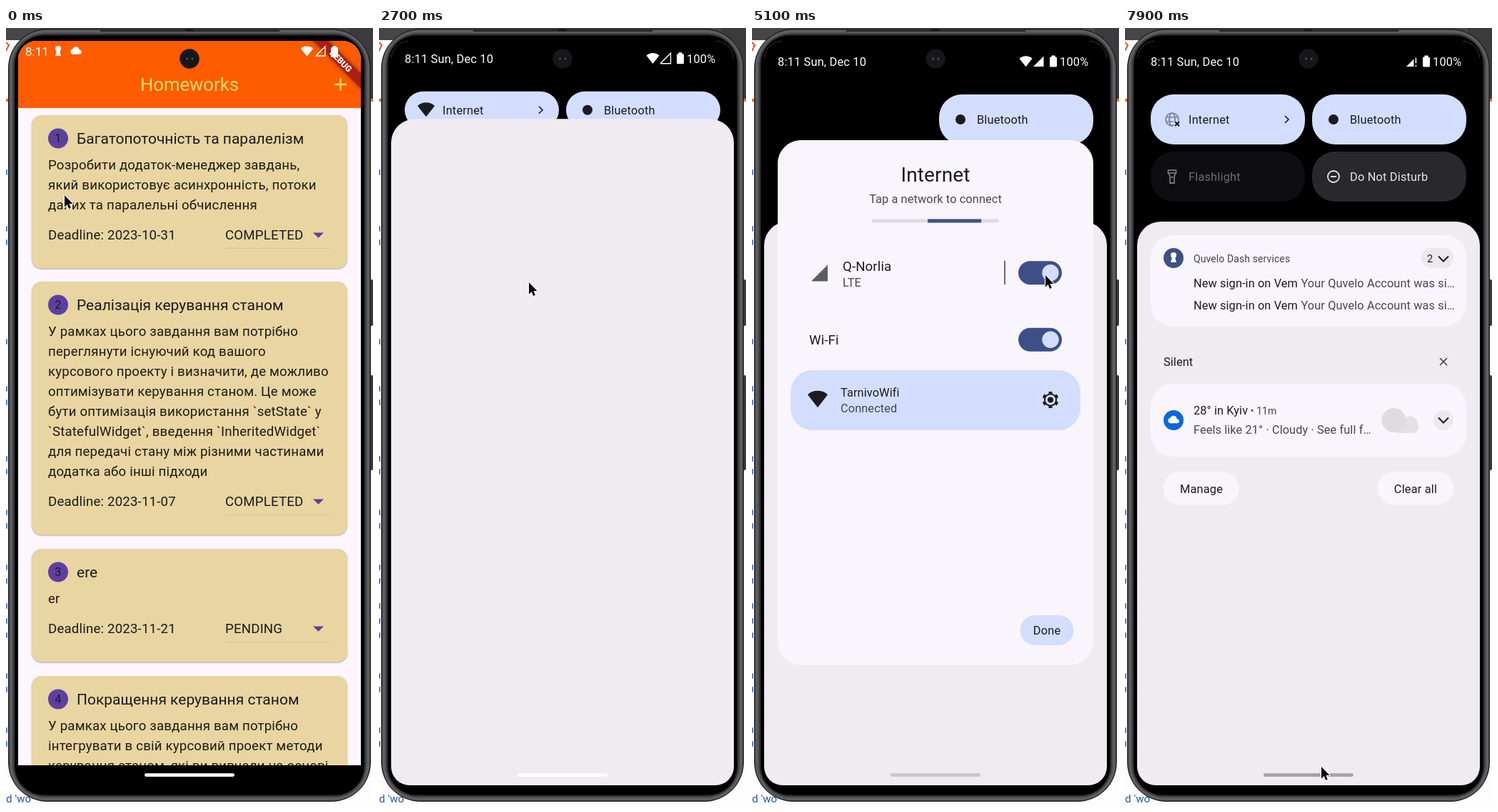
An HTML page with a canvas for the animation above (8000 ms loop, 514 px wide and 1089 px high).

```html
<!DOCTYPE html>
<html lang="uk">
<head>
<meta charset="utf-8">
<style>
  html, body { margin: 0; width: 514px; height: 1089px; overflow: hidden; }
  canvas { display: block; }
</style>
</head>
<body>
<canvas id="stage" width="514" height="1089"></canvas>
<script>
const g = document.getElementById('stage').getContext('2d');
const INK = '#1b1b1f', GREY = '#46464d', BLUE = '#d3deff', NAVY = '#3e4f88', CARD = '#f9f5fc';
const PURPLE = '#5e3fa0', YELLOW = '#fadc6b', LOOP = 8000, BODY = 16.33;

const clamp = x => Math.max(0, Math.min(1, x));
const lerp = (a, b, k) => a + (b - a) * k;
const smooth = x => (x = clamp(x), x * x * (3 - 2 * x));
const easeOut = x => 1 - (1 - clamp(x)) ** 3;

// Piecewise eased value for keys [time, ...values]
function track(keys, t) {
  const i = keys.findIndex(k => k[0] > t);
  if (i < 0) return keys.at(-1).slice(1);
  const a = keys[i - 1], b = keys[i], k = smooth((t - a[0]) / (b[0] - a[0]));
  return a.slice(1).map((v, j) => lerp(v, b[j + 1], k));
}

function box(x, y, w, h, r, fill) {
  g.beginPath();
  g.roundRect(x, y, w, h, r);
  g.fillStyle = fill;
  g.fill();
}
function disc(x, y, r, fill) {
  g.beginPath();
  g.arc(x, y, r, 0, 7);
  g.fillStyle = fill;
  g.fill();
}
function ring(x, y, r, color, width) {
  g.beginPath();
  g.arc(x, y, r, 0, 7);
  g.strokeStyle = color;
  g.lineWidth = width;
  g.stroke();
}
function poly(points, fill) {
  g.beginPath();
  points.forEach(p => g.lineTo(...p));
  g.closePath();
  g.fillStyle = fill;
  g.fill();
}
function line(points, color, width) {
  g.beginPath();
  points.forEach(p => g.lineTo(...p));
  g.strokeStyle = color;
  g.lineWidth = width;
  g.stroke();
}
// y is the middle of the capitals; returns the end of the text
function text(s, x, y, size, fill, { ls = 0.1, weight = 400, align = 'left' } = {}) {
  g.font = `${weight} ${size}px Roboto, sans-serif`;
  g.letterSpacing = ls + 'px';
  g.textAlign = align;
  g.fillStyle = fill;
  g.fillText(s, x, y + size * 0.355);
  return x + g.measureText(s).width;
}
function faded(alpha, draw) {
  if (alpha <= 0) return;
  g.save();
  g.globalAlpha *= Math.min(1, alpha);
  draw();
  g.restore();
}

// Icons
function wifi(x, y, w, fill) {
  const h = w * 0.4;
  g.beginPath();
  g.moveTo(x, y + h);
  g.lineTo(x - w / 2, y - h * 0.6);
  g.bezierCurveTo(x - w / 4, y - h * 1.25, x + w / 4, y - h * 1.25, x + w / 2, y - h * 0.6);
  g.fillStyle = fill;
  g.fill();
}
function signal(x, y, s, color, mode) {
  const tri = [[x, y + s], [x + s, y + s], [x + s, y]];
  if (mode === 'empty') {
    line([...tri, tri[0]], color, 1.4);
    return;
  }
  if (mode === 'full') return poly(tri, color);
  const cut = x + s * 0.72;
  poly([[x, y + s], [cut, y + s], [cut, y + s * 0.28]], color);
  box(x + s * 0.87, y + s * 0.15, s * 0.11, s * 0.52, 0, color);
  box(x + s * 0.87, y + s * 0.85, s * 0.11, s * 0.15, 0, color);
}
function battery(x, y) {
  box(x + 2.5, y, 5, 3, 0, '#fff');
  box(x, y + 2, 10, 14, 1.5, '#fff');
}
function keyhole(x, y, s, fill) {
  disc(x, y - 3 * s, 4 * s, fill);
  poly([[x - 2 * s, y], [x + 2 * s, y], [x + 4 * s, y + 7 * s], [x - 4 * s, y + 7 * s]], fill);
}
function cloud(x, y, s, fill) {
  disc(x - 4 * s, y + s, 4 * s, fill);
  disc(x, y - s, 5 * s, fill);
  disc(x + 5 * s, y + 1.8 * s, 3.2 * s, fill);
  box(x - 4 * s, y + s, 9 * s, 4 * s, 0, fill);
}
const chevronDown = (x, y) => line([[x - 7, y - 3.5], [x, y + 3.5], [x + 7, y - 3.5]], INK, 2);
const cross = (x, y, r, c, w) => {
  line([[x - r, y - r], [x + r, y + r]], c, w);
  line([[x - r, y + r], [x + r, y - r]], c, w);
};
function globe(x, y) {
  const c = '#77809a';
  ring(x, y, 9, c, 1.7);
  g.beginPath();
  g.ellipse(x, y, 4, 9, 0, 0, 7);
  g.stroke();
  line([[x - 8, y - 3], [x + 8, y - 3]], c, 1.5);
  line([[x - 8, y + 3], [x + 8, y + 3]], c, 1.5);
  box(x + 2, y + 2, 9, 9, 0, BLUE);
  cross(x + 7, y + 6, 3, INK, 2.2);
}
function torch(x, y, c) {
  g.strokeStyle = c;
  g.lineWidth = 1.8;
  g.strokeRect(x - 5.5, y - 9, 11, 4);
  line([[x - 5.5, y - 5], [x - 3, y - 1], [x - 3, y + 9], [x + 3, y + 9], [x + 3, y - 1], [x + 5.5, y - 5]], c, 1.8);
  disc(x, y + 1, 1.4, c);
}
function gear(x, y) {
  ring(x, y, 8, INK, 2.2);
  for (let i = 0; i < 6; i++) {
    const a = i * Math.PI / 3 + Math.PI / 6, c = Math.cos(a), s = Math.sin(a);
    line([[x + c * 8, y + s * 8], [x + c * 11.5, y + s * 11.5]], INK, 5);
  }
  disc(x, y, 7, BLUE);
  disc(x, y, 4, INK);
}

// Phone and the desktop slivers around it
function desktop() {
  box(0, 0, 514, 1089, 0, '#fdfdfd');
  box(0, 0, 514, 17, 0, '#464648');
  box(480, 0, 34, 100, 0, '#3b3b3d');
  box(0, 99, 514, 4, 0, '#e8722e');
  line([[0, 20], [4, 24], [0, 32]], '#e2572b', 2);
  for (const y of [202, 281, 300, 439, 505, 524, 603, 621, 678, 697, 755, 774, 809, 830, 850, 907, 926, 983, 1002])
    box(0, y - 4, 2, 8, 1, '#5c86cc');
  text("d 'wo", 0, 1079, 15, '#2455a8');
  for (const [y, h] of [[352, 65], [486, 133]]) box(507, y, 7, h, 2, '#39393b');
  const shells = [[3, '#1c1c1d'], [4.5, '#5f5f62'], [8.5, '#4a4a4d'], [10.5, '#2b2b2d'], [12.5, '#000']];
  for (const [d, c] of shells) box(d, d - 2, 514 - 2 * d, 1088 - 2 * d, 60 - d * 1.6, c);
  line([[132, 4], [383, 4]], '#222', 2);
  box(251, 1, 11, 4, 0, '#1a1a1a');
}

const tasks = [
  [122, 'Багатопоточність та паралелізм', '2023-10-31', 'COMPLETED',
    ['Розробити додаток-менеджер завдань,', 'який використовує асинхронність, потоки', 'даних та паралельні обчислення']],
  [355, 'Реалізація керування станом', '2023-11-07', 'COMPLETED',
    ['У рамках цього завдання вам потрібно', 'переглянути існуючий код вашого', 'курсового проекту і визначити, де можливо',
      'оптимізувати керування станом. Це може', 'бути оптимізація використання `setState` у',
      '`StatefulWidget`, введення `InheritedWidget`', 'для передачі стану між різними частинами', 'додатка або інші підходи']],
  [729, 'ere', '2023-11-21', 'PENDING', ['er']],
  [907, 'Покращення керування станом', '', '',
    ['У рамках цього завдання вам потрібно', 'інтегрувати в свій курсовий проект методи', 'керування станом, які ви вивчали на основі']]
];

function taskCard([top, title, date, status, rows], i) {
  const due = top + 70 + rows.length * 28 + 13.5, ls = 0.175;
  g.save();
  g.shadowColor = '#0005';
  g.shadowBlur = 2;
  g.shadowOffsetY = 1;
  box(36, top, 442, due + 47 - top, 14, '#e8d5a1');
  g.restore();
  disc(73, top + 32.5, 14, PURPLE);
  text(i + 1, 73, top + 32.5, 16.3, INK, { align: 'center' });
  text(title, 99, top + 33, 21, INK, { ls: 0 });
  rows.forEach((s, j) => text(s, 59, top + 69.5 + j * 28, 18.67, '#1f1b16', { ls }));
  if (!date) return;
  text('Deadline: ' + date, 59, due, 18.67, INK, { ls });
  text(status, 307, due, 18.67, INK, { ls });
  poly([[430, due - 3], [445, due - 3], [437.5, due + 4.3]], PURPLE);
  box(307, due + 18.5, 148, 1, 0, '#d6c7a3');
}

function app() {
  box(17, 18, 480, 1014, 0, '#fdf6ff');
  g.save();
  g.beginPath();
  g.rect(17, 112, 480, 920);
  g.clip();
  tasks.forEach(taskCard);
  g.restore();
  box(17, 18, 480, 94, 0, '#ff5c00');
  text('Homeworks', 257, 79, 25.67, YELLOW, { align: 'center', ls: 0 });
  line([[460, 79], [477, 79]], YELLOW, 2.3);
  line([[468.5, 70.5], [468.5, 87.5]], YELLOW, 2.3);
  g.save();
  g.translate(497, 18);
  g.rotate(Math.PI / 4);
  g.shadowColor = '#0008';
  g.shadowBlur = 6;
  box(-80, 32.7, 160, 14, 0, '#ad1d12');
  g.shadowColor = 'transparent';
  text('DEBUG', 0, 39.7, 11.9, '#fff', { weight: 900, align: 'center', ls: 0 });
  g.restore();
  text('8:11', 27, 33, 17, '#fff', { ls: 0 });
  keyhole(73, 32, 1, '#fff');
  cloud(98, 32, 0.95, '#fff');
  wifi(421.5, 33, 17, '#fff');
  signal(434, 26, 13, '#fff', 'empty');
  battery(455, 25);
}

function tile(x, y, h, label, fill, color, icon) {
  box(x, y, 216, h, Math.min(32, h / 2), fill);
  icon(x + 30, y + h / 2);
  text(label, x + 53, y + h / 2, BODY, color, { ls: 0.2 });
}

function notifications() {
  box(36, 290, 442, 127.5, 31, CARD);
  disc(68, 322, 14, NAVY);
  keyhole(68, 321, 1, '#fff');
  text('Quvelo Dash services', 96, 323, 14, GREY);
  box(415, 308, 45, 28, 14, '#ece8ee');
  text('2', 423, 323, 14.5, INK);
  chevronDown(446, 323);
  for (const y of [357, 388.5]) {
    const x = text('New sign-in on Vem', 96, y, BODY, INK);
    text('Your Quvelo Account was si…', x + 4.5, y, BODY, GREY);
  }
  text('Silent', 54, 467, BODY, INK);
  cross(446, 467, 5, GREY, 1.7);
  box(36, 498, 442, 102, 31, CARD);
  disc(68, 549, 14, '#0b66dd');
  cloud(68, 548.5, 0.95, '#fff');
  const x = text('28° in Kyiv', 96, 535.5, BODY, INK);
  text(' • 11m', x, 536, 14, GREY);
  text('Feels like 21° · Cloudy · See full f…', 96, 562.5, BODY, GREY);
  disc(399, 555, 11.5, '#e4e0e4');
  box(376, 552, 35, 15, 7.5, '#e4e0e4');
  disc(376.5, 549, 17, '#dfdbdf');
  disc(446, 549, 14, '#ece8ee');
  chevronDown(446, 549);
  for (const [left, label] of [[54, 'Manage'], [354, 'Clear all']]) {
    box(left, 621, 106, 46.5, 23, CARD);
    text(label, left + 53, 645, BODY, INK, { ls: 0.2, align: 'center' });
  }
}

function shade(t, p, dialogOpen, wifiOn) {
  const top = 271 * p, lift = -8 * (1 - p), h = 36 + 34 * p;
  faded(p * 3, () => box(17, 18, 480, 1042, 0, '#000'));
  faded(p * 2.5, () => {
    const y = 47 + lift, row1 = 93 + lift, row2 = row1 + h + 10;
    text('8:11 Sun, Dec 10', 36, y, BODY, '#fff', { ls: 0.2 });
    if (wifiOn) wifi(383.5, y, 18, '#fff');
    signal(394, y - 7.5, 14.5, '#fff', !wifiOn ? 'alert' : t < 3000 ? 'empty' : 'full');
    battery(417, y - 8.5);
    text('100%', 431, y, BODY, '#fff', { ls: 0.2 });
    if (!dialogOpen) {
      tile(36, row1, h, 'Internet', BLUE, INK, (x, y) => wifiOn ? wifi(x, y, 24, INK) : globe(x, y));
      const m = row1 + h / 2;
      line([[224, m - 5], [229, m], [224, m + 5]], INK, 1.7);
    }
    tile(262, row1, h, 'Bluetooth', BLUE, INK, (x, y) => disc(x, y, 7, INK));
    tile(36, row2, h, 'Flashlight', '#0e0d11', '#6e6c71', (x, y) => torch(x, y, '#77757a'));
    tile(262, row2, h, 'Do Not Disturb', '#29282d', '#e8e4ec', (x, y) => {
      ring(x, y, 8, '#e8e4ec', 1.8);
      line([[x - 4, y], [x + 4, y]], '#e8e4ec', 1.8);
    });
  });
  faded(p * 2.2, () => box(17, top, 480, 1100 - top, 33, '#efebf1'));
  faded((p - 0.5) * 2, () => {
    g.translate(0, top - 271);
    notifications();
  });
}

function toggle(y, on) {
  box(373, y - 16.5, 61, 33, 16.5, on ? NAVY : '#5c5b66');
  disc(on ? 418 : 390, y, 11.7, on ? BLUE : '#a09ea9');
}

function dialogContent(t, top, bottom, wifiOn, mobileOn) {
  const mid = { align: 'center' };
  text('Internet', 257, top + 48.5, 28, INK, mid);
  text(wifiOn ? 'Tap a network to connect' : 'Wi-Fi is off', 257, top + 82, BODY, GREY, mid);
  box(168, top + 110.5, 178, 5, 0, '#dedbe5');
  if (wifiOn) {
    const left = 93 + ((t - 5100) / 1400 + 4.605) % 1 * 253;
    const a = Math.max(168, left), b = Math.min(346, left + 75);
    box(a, top + 110.5, Math.max(0, b - a), 5, 0, NAVY);
  }
  signal(83, top + 174.5, 23, '#5d5d69', mobileOn ? 'full' : 'alert');
  text('Q-Norlia', 127, top + (mobileOn ? 176 : 165), 18.67, INK);
  const notes = mobileOn ? ['LTE'] : ["Mobile data won't", 'auto-connect'];
  notes.forEach((s, i) => text(s, 127, top + (mobileOn ? 199 : 189) + i * 19, BODY, GREY));
  box(353.2, top + 169, 1.6, 33, 0, GREY);
  toggle(top + 185.7, mobileOn);
  text('Wi-Fi', 80, top + 279.7, 18.67, INK);
  toggle(top + 279.3, wifiOn);
  if (wifiOn) {
    box(54, top + 322, 406, 84, 31, BLUE);
    wifi(92, top + 363, 28, INK);
    text('TarnivoWifi', 124, top + 353, BODY, INK);
    text('Connected', 124, top + 375.5, BODY, GREY);
    gear(418, top + 363.5);
  } else {
    ring(94, top + 353.5, 10.5, '#5d5d69', 2);
    box(93, top + 352, 2.2, 7, 0, '#5d5d69');
    box(93, top + 347.5, 2.2, 2.4, 0, '#5d5d69');
    ['To improve device experience, apps and', 'services can still scan for Wi-Fi networks at any',
      'time, even when Wi-Fi is off. You can change this'].forEach((s, i) => text(s, 80, top + 402.5 + i * 19.1, BODY, GREY));
    const x = text('in Wi-Fi scanning settings. ', 80, top + 459.8, BODY, GREY);
    const end = text('Change', x, top + 459.8, BODY, NAVY);
    box(x, top + 467.5, end - x, 1.2, 0, NAVY);
  }
  const done = bottom - (wifiOn ? 49 : 63);
  box(375.5, done - 21, 75, 42, 21, BLUE);
  text('Done', 413, done, BODY, INK, { ls: 0.2, align: 'center' });
}

// The dialog grows out of the Internet tile and shrinks back into it
function dialog(t, grow, wifiOn, mobileOn) {
  const [top, bottom] = wifiOn ? [157, 892] : [233, 818];
  const y = lerp(93, top, grow), h = lerp(163, bottom, grow) - y, w = lerp(216, 442, grow);
  box(36, y, w, h, 33, BLUE);
  faded(grow * 3, () => box(36, y, w, h, 33, CARD));
  faded((grow - 0.8) * 5, () => {
    g.beginPath();
    g.roundRect(36, y, w, h, 33);
    g.clip();
    dialogContent(t, top, bottom, wifiOn, mobileOn);
  });
}

const pointer = [[0, 82, 234], [1000, 133, 20], [2000, 133, 20], [2700, 210, 356], [3000, 214, 390], [3800, 184, 128],
  [4400, 184, 128], [5000, 411, 346], [5300, 411, 346], [5700, 410, 437], [5900, 410, 437], [6400, 398, 729],
  [6700, 406, 748], [7150, 406, 748], [7900, 275, 1034], [8000, 275, 1034]];
const handle = [[0, 253], [2800, 253], [4000, 112], [4500, 112], [5100, 198], [5500, 253], [7200, 253], [7900, 163], [8000, 163]];

function cursor(x, y) {
  g.save();
  g.translate(x, y);
  g.scale(0.92, 0.95);
  g.lineJoin = 'round';
  const shape = [[0, 0], [0, 17.5], [4, 13.8], [6.6, 20], [9.6, 18.7], [7, 12.7], [12.5, 12.7], [0, 0]];
  line(shape, '#fff', 2.4);
  poly(shape, '#000');
  g.restore();
}

function draw(now) {
  const t = Math.floor(now % LOOP / 100) * 100;
  const p = smooth((t - 2220) / 1000);
  const wifiOn = t < 5900, mobileOn = t < 5300;
  const grow = easeOut((t - 4100) / 485) - easeOut((t - 7120) / 485);
  desktop();
  g.save();
  g.beginPath();
  g.roundRect(17, 18, 480, 1042, 26);
  g.clip();
  box(17, 18, 480, 1042, 0, '#000');
  app();
  if (p > 0) shade(t, p, grow > 0, wifiOn);
  if (grow > 0) dialog(t, grow, wifiOn, mobileOn);
  const [v] = track(handle, t);
  box(194, 1043.3, 126, 4.6, 2.3, `rgb(${v},${v},${v})`);
  g.restore();
  disc(257, 43, 13.7, '#17171a');
  disc(253.5, 43, 1.5, '#55504a');
  disc(261, 43, 1.5, '#55504a');
  cursor(...track(pointer, t));
  requestAnimationFrame(draw);
}
requestAnimationFrame(draw);
</script>
</body>
</html>
```
